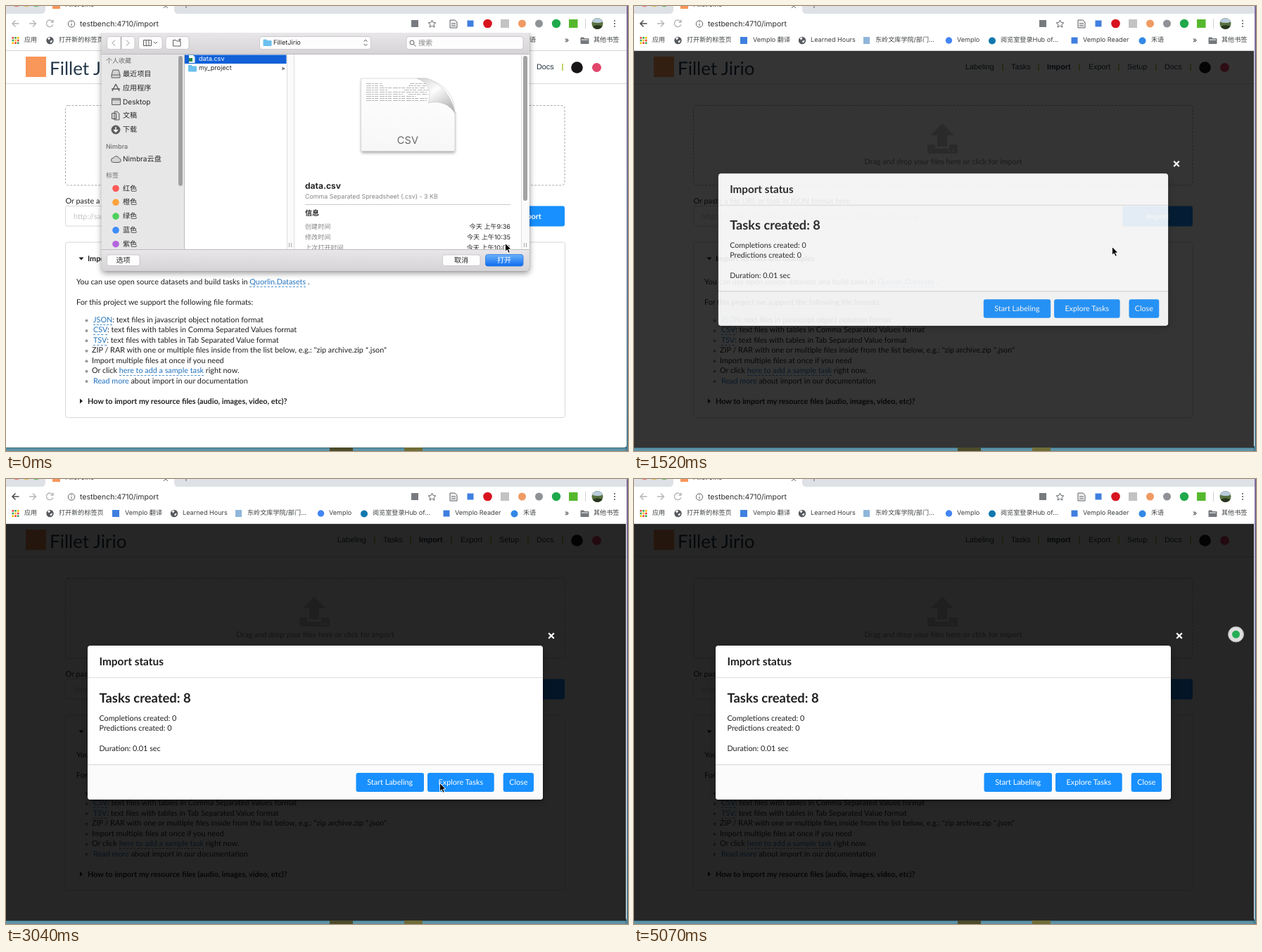
Animation, 884 px wide and 633 px high, one loop 5.17 s. Source, as an HTML page:

```html
<!DOCTYPE html>
<html lang="zh-CN">
<head>
<meta charset="utf-8">
<title>Import</title>
<style>
html, body { margin: 0; width: 100%; height: 100%; overflow: hidden; }
body { position: relative; background: #5c93a7; text-rendering: geometricPrecision; }
#stage { position: absolute; left: 0; top: 0; width: 884px; height: 633px; overflow: hidden; }
.layer { position: absolute; inset: 0; }
svg { position: absolute; left: 0; top: 0; width: 884px; height: 633px; }
.t { position: absolute; white-space: pre; line-height: 20px; transform: translate(0, -50%); }
.c { transform: translate(-50%, -50%); }
.r { transform: translate(-100%, -50%); }
.b { font-weight: 700; }
.w { color: #fff; }
.g { color: #858585; }
.s { font-size: 9.1px; }

#page, #dim { font: 10.8px Lato, sans-serif; color: #1f1f1f; }
#page a { color: #2373bf; }
#page a:not(.plain) { border-bottom: 1px dashed #4d8fcb; }
.nav { font: 10.8px "Liberation Sans", Arial, sans-serif; line-height: 20px; color: #1d2b3a; }
.nav.b { font-weight: 700; }
.brand { font-size: 26px; color: #24374b; }
.hint { color: #7d7d7d; }
.ghost { color: #c2c2c2; }
#bar, #sheet, .status { font: 9.1px Inter, "Noto Sans CJK SC", "Noto Sans CJK", sans-serif; color: #3c4043; }
.url { font-size: 10.5px; color: #2b2d30; }

#dim { clip-path: inset(64px 3px 5px 0); background: rgba(0,0,0,.85); animation: dim 5.17s step-end infinite; }
#modal { transform-origin: 439.5px 346px; animation: modal 5.17s step-end infinite; }
.card { position: absolute; left: 116px; top: 237px; width: 647px; height: 219px; border-radius: 4px; background: #fff; overflow: hidden; box-shadow: 1px 3px 3px rgba(0,0,0,.2), 1px 3px 15px 2px rgba(0,0,0,.2); }
.card::before { content: ""; position: absolute; inset: 45px 0 auto; border-top: 1px solid #dcdcdc; }
.card::after { content: ""; position: absolute; inset: 169px 0 0; border-top: 1px solid #d5d5d5; background: #fbfbfb; }
.h1 { font-size: 18.4px; }
.h2 { font-size: 15.4px; }
.tip { font-size: 4.9px; }
#hover { animation: hover 5.17s step-end infinite; }
#badge { animation: badge 5.17s step-end infinite; }
#back { animation: back 5.17s step-end infinite; }

#clip { clip-path: inset(38px 0 0 0); }
#sheet { color: #262626; animation: sheet 5.17s step-end infinite; }
.panel { position: absolute; left: 135.5px; top: 37px; width: 608px; height: 340px; border-radius: 0 0 5px 5px; background: #dedcde; box-shadow: 0 3px 8px rgba(0,0,0,.42), 0 0 1px rgba(0,0,0,.5); }
.m { font-size: 10.1px; }
.head { font-size: 9px; color: #6d6d6d; font-weight: 500; }
.csv { font-size: 14.5px; color: #6a6a6a; letter-spacing: .2px; }
.title { font-size: 12px; }
.kind { font-size: 8.9px; }
#body { clip-path: inset(0 0 287px 0); }
#cursor { width: 12px; height: 18px; overflow: visible; animation: cursor 5.17s step-end infinite; }

@keyframes dim { 0% { opacity: 0 } 29.4% { opacity: .94 } 39.264% { opacity: 1 } }
@keyframes modal { 0% { opacity: 0; transform: scale(.8) } 29.4% { opacity: .95; transform: scale(.988) } 39.264% { opacity: 1; transform: none } }
@keyframes hover { 0% { visibility: hidden } 68.471% { visibility: visible } 78.336% { visibility: hidden } }
@keyframes badge { 0% { visibility: hidden } 78.336% { visibility: visible } }
@keyframes back { 0% { stroke: #b4b6b9 } 29.4% { stroke: #4a4d51 } 98.065% { stroke: #b4b6b9 } }
@keyframes sheet { 0% { transform: none } 19.729% { transform: translateY(-322px) } 29.4% { visibility: hidden; transform: translateY(-400px) } }
@keyframes cursor {
  0% { transform: translate(709px, 337px) }
  9.864% { transform: translate(708px, 362px) }
  19.729% { transform: translate(708px, 363px) }
  29.4% { transform: translate(679px, 342px) }
  39.264% { transform: translate(265px, 315px) }
  48.936% { transform: translate(217px, 307px) }
  58.8% { transform: translate(616px, 432px) }
  68.471% { transform: translate(740px, 353px) }
  78.336% { transform: translate(854px, 221px) }
  88.201% { transform: translate(853px, 623px) }
  98.065%, 100% { transform: translate(853px, 650px) }
}
</style>
</head>
<body>
<div id="stage">

<svg>
  <defs>
    <linearGradient id="edge" x2="0" y2="1"><stop stop-color="#7c6a9c"/><stop offset=".5" stop-color="#6f7ba3"/><stop offset="1" stop-color="#4f8296"/></linearGradient>
  </defs>
  <path fill="url(#edge)" d="M880 0h4v633h-4z"/>
  <path fill="#3d6676" d="M0 626h882v3H0z"/>
  <path fill="#4c4c2c" d="M460 627h33v6h-33z"/>
  <path fill="#716d38" d="M566 627h26v6h-26z"/>
</svg>

<div id="page" class="layer">
  <svg fill="none">
    <path fill="#fff" d="M0 60h882v564q0 4-4 4H0z"/>
    <path stroke="#d9d9d9" d="M0 110.500h882"/>
    <path fill="#f9965a" d="M28 72h29v29H28z"/>
    <path id="seps" stroke="#a5bf2a" stroke-width="1.400"/>
    <circle cx="811.500" cy="87.500" r="8.300" fill="#171515"/>
    <circle cx="839.500" cy="87.500" r="6.500" fill="#e0466c"/>
    <rect x="84.500" y="141.500" width="709.500" height="113.500" rx="4" stroke="#a9a9a9" stroke-dasharray="3 2"/>
    <g fill="#cfcfcf">
      <path d="M438 167l16.500 17H445v16h-14v-16h-9.500z"/>
      <path d="M419 197h9v6h20v-6h9q3 0 3 3v8q0 2-2 2h-39q-2 0-2-2v-8q0-3 2-3z"/>
    </g>
    <path stroke="#fff" stroke-width="2" d="M447 206.500h2.500m3 0h2.500"/>
    <path stroke="#dadada" d="M695 284.500H87q-2.500 0-2.500 2.500v23.500q0 2.500 2.500 2.500h608"/>
    <path fill="#1890ff" d="M694.500 284.500H791q3 0 3 3v23q0 3-3 3h-96.500z"/>
    <rect x="84.500" y="336" width="710" height="249.500" rx="3" stroke="#d8d8d8"/>
    <path fill="#1f1f1f" d="M103.500 357.500h7l-3.500 4zM105 558.500v7l4-3.500z"/>
    <g id="bullets" fill="#999"></g>
  </svg>
</div>

<div id="dim" class="layer">
  <div id="modal" class="layer">
    <div class="card"></div>
    <svg>
      <path stroke="#fff" stroke-width="2.300" d="M771.200 219.200l7.600 7.600m0-7.600l-7.600 7.600"/>
      <g fill="#1890ff">
        <rect x="497.500" y="418" width="96.500" height="27" rx="3"/>
        <rect x="599" y="418" width="94.700" height="27" rx="3"/>
        <rect x="706.700" y="418" width="43.300" height="27" rx="3"/>
      </g>
    </svg>
  </div>
  <div id="hover" class="layer">
    <svg>
      <rect x="615.500" y="398.500" width="60.500" height="13" rx="2" fill="#fff" stroke="#cfcfcf"/>
      <path fill="#cfd0d1" d="M0 612h93q3 0 3 3v13H0z"/>
    </svg>
  </div>
  <svg id="badge">
    <circle cx="855.500" cy="221" r="11" fill="#dedede" stroke="#a4a4a4"/>
    <circle cx="855.500" cy="221" r="5.500" fill="#25ad55"/>
  </svg>
</div>

<div id="bar" class="layer">
  <svg fill="none">
    <path fill="#fff" d="M0 0h882v64H0z"/>
    <path fill="#dee1e6" d="M0 0h56v5q0 6-6 6H0zM239 0h643v11H245q-6 0-6-6z"/>
    <path stroke="#d6d6d6" d="M0 63.500h882"/>
    <path fill="#ee8078" d="M11 0h8q-4 2.500-8 0z"/><path fill="#e9bd58" d="M25 0h8q-4 2.500-8 0z"/><path fill="#6bc266" d="M39 0h8q-4 2.500-8 0z"/>
    <path fill="#f9965a" d="M66 0h11v4H66z"/>
    <path stroke="#5f6368" d="M224 3l3-3 3 3M256 0v3"/>
    <path id="back" stroke-width="1.500" d="M18.500 25H9m4.500-4.500L9 25l4.500 4.500"/>
    <g stroke="#b4b6b9" stroke-width="1.400">
      <path d="M33 25h9.500M38 20.500l4.500 4.500-4.500 4.500"/>
      <path d="M66.500 22.500a4.800 4.800 0 1 0 .3 4M67 19.500v3.500h-3.500"/>
    </g>
    <g stroke="#5f6368">
      <circle cx="93" cy="25.500" r="4.700"/><path d="M93 25v3.200m0-6v1.300"/>
      <path d="M605.500 20l1.600 3.500 3.700.4-2.800 2.500.8 3.800-3.300-2-3.300 2 .8-3.800-2.800-2.500 3.700-.4z"/>
      <path fill="#eee" d="M631 20h7l3 3v8h-10zM633 25h6m-6 3h6"/>
      <path stroke="#cfd1d4" d="M823.500 18v14"/>
    </g>
    <path fill="#777b80" d="M576 20h10v10h-10z"/>
    <path fill="#3f7fe0" d="M655.500 20.500h9v9h-9z"/>
    <circle cx="684.500" cy="25" r="6.300" fill="#d8131f"/>
    <path fill="#c3c3c3" d="M703 19h12v12h-12z"/>
    <circle cx="733.500" cy="25" r="5.500" fill="#ef9a63"/>
    <circle cx="757.500" cy="25" r="5.500" fill="#8e9195"/>
    <circle cx="782" cy="25" r="6.200" fill="#1fa94c"/>
    <path fill="#55b82e" d="M800 19h12.500v12H800z"/>
    <circle cx="840.500" cy="25" r="8" fill="#56703f"/>
    <path fill="#b9cbdc" d="M833 22.500a8 8 0 0 1 15 0q-7 3-15 0z"/>
    <path fill="#29351f" d="M834 29.500q6-4 13.500-.5a8 8 0 0 1-13.500.5z"/>
    <path stroke="#5f6368" stroke-width="2.200" stroke-linecap="round" stroke-dasharray="0 4" d="M865 21v9"/>
    <g id="apps"></g>
    <g id="globes"></g>
    <path fill="#3f7fe0" d="M151 44h10v10h-10zM621.500 44.500h9v9h-9z"/>
    <path fill="#8fb6da" d="M326 44h9v10h-9z"/>
    <circle cx="447.500" cy="49" r="4.700" fill="#4285f4"/>
    <circle cx="509" cy="49.500" r="5" fill="#1277ad"/>
    <circle cx="722.500" cy="49.500" r="5" fill="#3288e6"/>
    <path fill="#74787c" d="M816.500 45.500q0-1 1-1h3.500l1.500 1.500h5q1 0 1 1v6q0 1-1 1h-10q-1 0-1-1z"/>
    <path stroke="#fff" d="M818 48h9"/>
  </svg>
</div>

<div id="clip" class="layer">
  <div id="sheet" class="layer">
    <div class="panel"></div>
    <svg fill="none">
      <defs>
        <linearGradient id="metal" x2="0" y2="1"><stop stop-color="#e9e7e9"/><stop offset="1" stop-color="#d5d3d5"/></linearGradient>
        <linearGradient id="blue" x2="0" y2="1"><stop stop-color="#6bb1fa"/><stop offset="1" stop-color="#0e6cf0"/></linearGradient>
        <linearGradient id="curl" x2=".7" y2="1"><stop stop-color="#d2d2d2"/><stop offset=".45" stop-color="#fdfdfd"/><stop offset="1" stop-color="#b5b5b5"/></linearGradient>
        <linearGradient id="paper" x2="0" y2="1"><stop stop-color="#fff"/><stop offset="1" stop-color="#f7f7f7"/></linearGradient>
        <filter id="soft"><feGaussianBlur stdDeviation="2"/></filter>
      </defs>
      <path fill="url(#metal)" d="M135.500 37h608v32h-608z"/>
      <path fill="url(#metal)" d="M135.500 346h608v26q0 5-5 5h-598q-5 0-5-5z"/>
      <path fill="#e8e7e8" d="M135.500 69H253v277H135.500z"/>
      <path fill="#fff" d="M253 69h490.500v277H253z"/>
      <path fill="#fafafa" d="M399 69h10v277h-10zM732 69h11.500v277H732z"/>
      <path stroke="#dedede" d="M399.500 69v277M409.500 69v277M732.500 69v277"/>
      <path stroke="#bdbbbd" d="M135.500 68.500h608M135.500 346.500h608M253.500 69v277"/>
      <path stroke="#a9a9a9" d="M402.500 337v6m3-6v6M736.500 337v6m3-6v6"/>
      <rect x="245" y="71" width="6" height="185" rx="3" fill="#a09fa0"/>
      <rect x="735" y="71" width="6" height="206" rx="3" fill="#a3a3a3"/>
      <g fill="#fdfdfd" stroke="#c3c1c3" stroke-width=".8">
        <rect x="143.500" y="43.500" width="39.500" height="18" rx="3.500"/>
        <rect x="188.500" y="43.500" width="33.500" height="18" rx="3.500"/>
        <rect x="227" y="43.500" width="33" height="18" rx="3.500"/>
        <rect x="360.500" y="43.500" width="158" height="18" rx="3.500"/>
        <rect x="569" y="43.500" width="166" height="18" rx="3.500"/>
        <rect x="143.500" y="354" width="46.500" height="15.500" rx="3"/>
        <rect x="620.500" y="354" width="53.500" height="15.500" rx="3"/>
      </g>
      <rect x="681.500" y="353.500" width="53.500" height="16.500" rx="3" fill="url(#blue)" stroke="#2a76dc" stroke-width=".8"/>
      <g stroke="#5e5e5e">
        <path stroke="#8e8e8e" d="M155 48.500l-4 4 4 4M171 48.500l4 4-4 4M163.500 44v17"/>
        <path d="M195.500 48.500h11v8h-11zM199.200 48.500v8M203 48.500v8M210 51l2.500 2.500L215 51"/>
        <path d="M237.500 48.500h4l1 1.500h5.500v7h-10.500zM247 46v4m-2-2h4"/>
        <path d="M508.500 50.500l2.500-2.500 2.500 2.500M508.500 54l2.500 2.500 2.500-2.500"/>
        <circle cx="577" cy="52" r="3"/><path d="M579.500 54.500l3 3"/>
      </g>
      <path fill="#1261d8" d="M254 69.500h144.500V82H254z"/>
      <path fill="#f4fbf4" d="M260 70h6l2.500 2.500V81H260z"/><path fill="#2c8a48" d="M260 74h5v5h-5z"/>
      <g fill="#6cc0ee"><path id="dir" d="M259 85q0-1 1-1h3.500l1.500 1.500h5q1 0 1 1v6q0 1-1 1h-10q-1 0-1-1z"/><use href="#dir" x="106.500" y="-36.500"/></g>
      <path fill="#777" d="M392.500 86.500v5l4.500-2.500z"/>
      <g stroke="#5c5c5c" fill="#d4d3d4">
        <path d="M152 91h8l2 7v4h-12v-4zM150 98h12"/>
        <path stroke-width="1.400" fill="none" d="M156 111l-5 10m5-10l5 10m-11-3h12"/>
        <path d="M150.500 131.500h12v9h-12zM150.500 133.500h12"/>
        <path d="M150.500 152.500h6v8h-6zM154 150h4l3 3v9h-7z"/>
        <circle cx="156" cy="176" r="6" fill="#5c5c5c"/><path stroke="#fff" stroke-width="1.400" d="M156 172v7m-3-3l3 3 3-3"/>
        <path d="M152.500 222.500h7.500a3 3 0 0 0 .5-6 4 4 0 0 0-7.500-.5 3.200 3.200 0 0 0-.5 6.500z"/>
      </g>
      <g id="tags"></g>
      <path fill="#000" opacity=".35" filter="url(#soft)" d="M505 106h94l39 46v57H505z"/>
      <path fill="url(#paper)" stroke="#cfcfcf" stroke-width=".7" d="M504.500 103H597q41 12 41 50v53.500H504.500z"/>
      <path stroke="#adadad" stroke-width=".9" stroke-dasharray="7 1 3 1 5 2" d="M512 110.500h22m40 0h22M512 113.500h24m36 0h25M512 116.500h84M512 119.500h30m24 0h34M512 122.500h86M512 125.500h52m8 0h28M512 128.500h70M512 131.500h88M512 134.500h86"/>
      <path fill="url(#curl)" stroke="#bbb" stroke-width=".5" d="M584 103h13c18 4 38 26 41 50-7-14-24-19-38-15 4-12 4-28-16-35z"/>
      <path stroke="#c9c9c9" d="M425 282.500h292"/>
    </svg>
    <div id="body" class="layer"></div>
  </div>
</div>

<svg id="cursor"><path d="M.5.500v11.800l2.700-2.500 1.900 4.500 2.200-1-1.900-4.300h3.600z" fill="#000" stroke="#fff" stroke-width=".9"/></svg>
</div>

<script>
const $ = id => document.getElementById(id);

// Each row: x, vertical centre, markup, classes
const write = (id, rows) => rows.forEach(([x, y, html, cls = '']) =>
  $(id).insertAdjacentHTML('beforeend', `<span class="t ${cls}" style="left:${x}px;top:${y}px">${html}</span>`));

const dots = (id, list) => {
  $(id).innerHTML = list.map(([x, y, r, fill]) =>
    `<circle cx="${x}" cy="${y}" r="${r}"${fill ? ` fill="${fill}"` : ''}/>`).join('');
};

const line = i => 447 + i * 14.43;

write('page', [
  [62, 87.5, 'Fillet Jirio', 'brand'],
  [471, 87, 'Labeling', 'nav'], [536, 87, 'Tasks', 'nav'], [587, 87, 'Import', 'nav b'],
  [646, 87, 'Export', 'nav'], [701, 87, 'Setup', 'nav'], [754, 87, 'Docs', 'nav'],
  [439.5, 222, 'Drag and drop your files here or click for import', 'c hint'],
  [84.5, 278, 'Or paste a file URL or task in JSON format here'],
  [96, 300, 'http://sample.test/tasks.json OR {"image_url": "http://an.photo.jpg"}', 'ghost'],
  [744.5, 299.5, 'Import', 'c b w'],
  [116, 360, 'Import formats and examples', 'b'],
  [100, 393, 'You can use open source datasets and build tasks in <a>Quorlin.Datasets</a> .'],
  [100, 422, 'For this project we support the following file formats:'],
  [124, line(0), '<a>JSON</a>: text files in javascript object notation format'],
  [124, line(1), '<a>CSV</a>: text files with tables in Comma Separated Values format'],
  [124, line(2), '<a>TSV</a>: text files with tables in Tab Separated Value format'],
  [122, line(3), 'ZIP / RAR with one or multiple files inside from the list below, e.g.: "zip archive.zip *.json"'],
  [122, line(4), 'Import multiple files at once if you need'],
  [122, line(5), 'Or click <a>here to add a sample task</a> right now.'],
  [124, line(6), '<a class="plain">Read more</a> about import in our documentation'],
  [116, 562.5, 'How to import my resource files (audio, images, video, etc)?', 'b']
]);
$('seps').setAttribute('d', [524, 575, 633, 689, 742, 791].map(x => `M${x} 82v10`).join(''));
dots('bullets', Array.from({ length: 7 }, (_, i) => [114.5, line(i) + .5, 2]));

write('modal', [
  [132.5, 260, 'Import status', 'b h2'],
  [132.5, 311, 'Tasks created: 8', 'b h1'],
  [132.5, 340.5, 'Completions created: 0'],
  [132.5, 355, 'Predictions created: 0'],
  [132.5, 384, 'Duration: 0.01 sec'],
  [545.7, 431.5, 'Start Labeling', 'c w'],
  [646.3, 431.5, 'Explore Tasks', 'c w'],
  [728.3, 431.5, 'Close', 'c w']
]);
write('hover', [
  [645.7, 405, 'Explore all imported tasks', 'c tip'],
  [1, 620, 'testbench:4710/tasks', 'status']
]);

write('bar', [
  [84, -1.5, 'Fillet Jirio'],
  [105, 25.5, 'testbench:4710/import', 'url'],
  [26, 49, '应用'], [75, 49, '打开新的标签页'], [169, 49, 'Vemplo 翻译'],
  [251, 49, 'Learned Hours'], [343, 49, '东岭文库学院/部门...'], [459, 49, 'Vemplo'],
  [521, 49, '阅览室登录Hub of...'], [638, 49, 'Vemplo Reader'], [735, 49, '禾语'],
  [794, 48.5, '»', 'url'], [835, 49, '其他书签']
]);
const appColors = ['#e94235', '#34a853', '#fbbc04'];
$('apps').innerHTML = Array.from({ length: 9 }, (_, i) =>
  `<rect x="${8.5 + i % 3 * 3.7}" y="${44 + (i / 3 | 0) * 3.7}" width="2.6" height="2.6" fill="${appColors[(i + (i / 3 | 0)) % 3]}"/>`).join('');
$('globes').innerHTML = [62.5, 239].map(x =>
  `<circle cx="${x}" cy="49" r="5.2" fill="#55595e"/><path fill="#fff" d="M${x - 3.5} 46q3-3 4 0l-2 2.500zM${x} 50l3.500-1.500q0 3-2.500 4z"/>`).join('');

const colors = [['红色', '#fc5b57'], ['橙色', '#fba33c'], ['绿色', '#4fd05c'], ['蓝色', '#3e8df8'], ['紫色', '#b264dc']];
const tagY = i => 259.5 + i * 19.8;
dots('tags', colors.map(([, fill], i) => [156, tagY(i), 4.8, fill]));

write('sheet', [
  [380, 52.5, 'FilletJirio', 's'], [586, 52.5, '搜索', 'm g'],
  [166.5, 362, '选项', 'c m'], [647, 362, '取消', 'c m'], [708, 362, '打开', 'c m w']
]);
write('body', [
  [142, 79, '个人收藏', 'head'],
  ...['最近项目', '应用程序', 'Desktop', '文稿', '下载'].map((s, i) => [166, 97 + i * 19.75, s, 'm']),
  [142, 201, 'Nimbra', 'head'], [166, 218, 'Nimbra云盘', 'm'],
  [142, 242, '标签', 'head'],
  ...colors.map(([name], i) => [166, tagY(i), name, 'm']),
  [274, 75.5, 'data.csv', 's w'], [274, 89, 'my_project', 's'],
  [571, 192, 'CSV', 'c csv'],
  [425, 255.5, 'data.csv', 'b title'],
  [425, 271.5, 'Comma Separated Spreadsheet (.csv) - 3 KB', 'g kind'],
  [425, 294.5, '信息', 'b m']
]);
[['创建时间', '9:36'], ['修改时间', '10:35'], ['上次打开时间', '10:06']].forEach(([name, time], i) =>
  write('body', [[425, 315 + i * 15, name, 's g'], [717, 315 + i * 15, '今天 上午' + time, 'r s']]));
</script>
</body>
</html>
```
